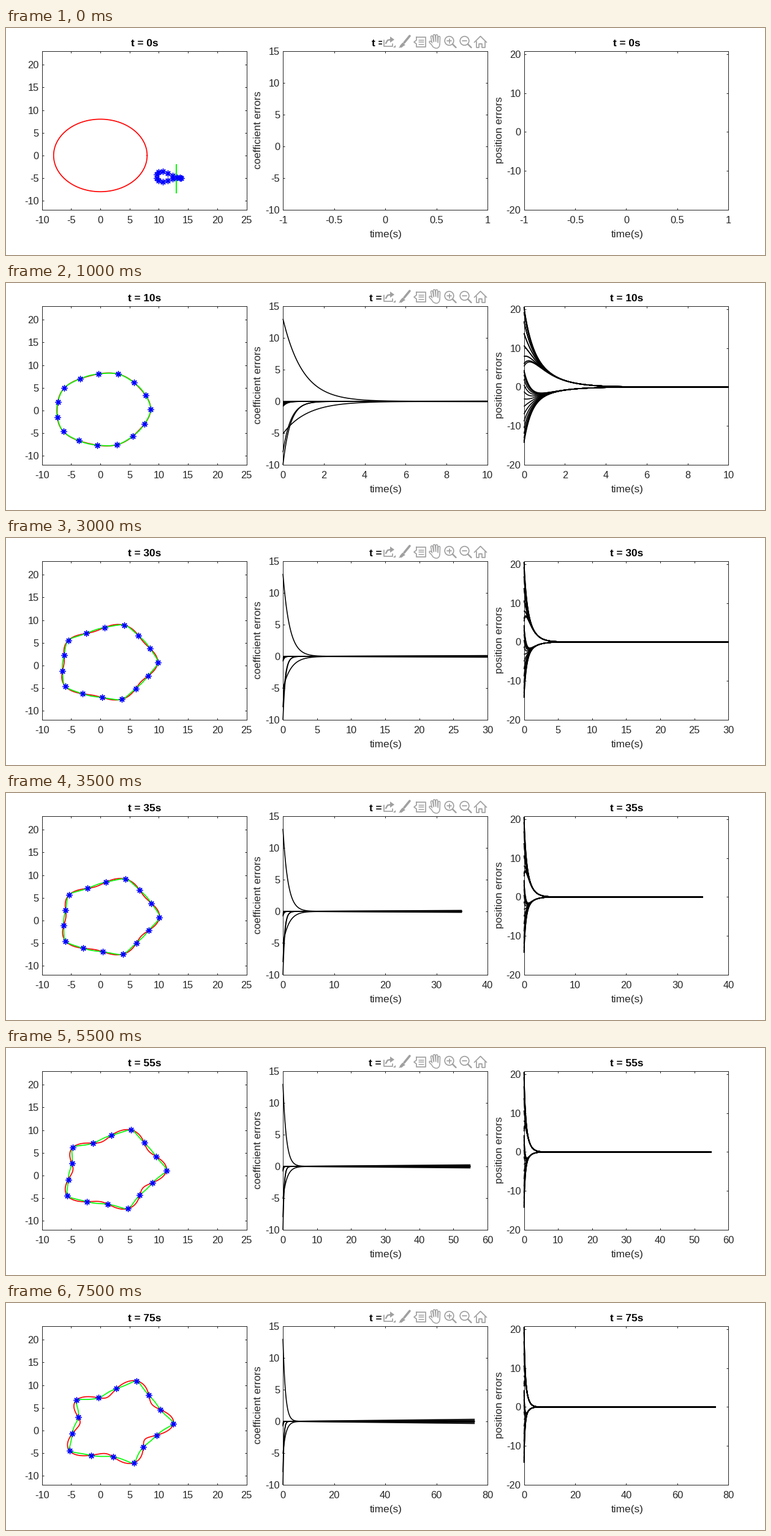
A matplotlib script that plays this animation: 1239x372 px, repeating every 8000 ms.

```python
import numpy as np
import matplotlib.pyplot as plt
from matplotlib.animation import FuncAnimation
from matplotlib.patches import Circle, Polygon, Rectangle

W, H, DPI = 1239, 372, 64
PT = 72 / DPI               # points per pixel
FRAMES, STEP = 16, 5        # one picture per 5 simulated seconds
N = 15                      # number of agents
INK, GRAY = "#262626", "#a0a0a0"

plt.rcParams.update({"font.family": "Liberation Sans", "axes.unicode_minus": False})
fig = plt.figure(figsize=(W / DPI, H / DPI), dpi=DPI, facecolor="white")


def panel(column, ylim, yticks):
    left, top, width, height = 58.65 + 393.45 * column, 38, 333.9, 260
    ax = fig.add_axes([left / W, 1 - (top + height) / H, width / W, height / H])
    ax.set_ylim(ylim)
    ax.set_yticks(yticks, [f"{v:g}" for v in yticks])
    ax.tick_params(direction="in", top=True, right=True, length=3.3 * PT, width=PT,
                   color=INK, labelcolor=INK, labelsize=16.4 * PT)
    ax.tick_params(axis="x", pad=10 * PT)
    ax.tick_params(axis="y", pad=5 * PT)
    for side in ax.spines.values():
        side.set(linewidth=PT, color=INK)
    return ax


def set_time_axis(ax, lo, hi, step):
    ticks = np.arange(lo, hi + step / 2, step)
    ax.set_xlim(lo, hi)
    ax.set_xticks(ticks, [f"{v:g}" for v in ticks])


shape_ax = panel(0, (-12, 23), range(-10, 21, 5))
coef_ax = panel(1, (-10, 15), range(-10, 16, 5))
pos_ax = panel(2, (-20, 20.75), range(-20, 21, 10))
set_time_axis(shape_ax, -10, 25, 5)

# Full-stage layer in pixel units for titles, labels and the toolbar
top = fig.add_axes([0, 0, 1, 1], facecolor="none")
top.set(xlim=(0, W), ylim=(H, 0))
top.axis("off")


def label(x, y, s, **kw):
    style = dict(ha="center", va="baseline", fontsize=17.2 * PT, color=INK)
    return top.text(x, y, s, **{**style, **kw})


titles = [label(226 + 393.7 * k, 30, "", weight="bold", color="black") for k in range(3)]
for x, s in ((416, "coefficient errors"), (810, "position errors")):
    label(x, 167, s, rotation=90, rotation_mode="anchor")
    label(x + 204, 343, "time(s)")


def stroke(*points, width=1.7, color=GRAY):
    x, y = zip(*points)
    top.plot(x, y, color=color, lw=width * PT, zorder=6,
             solid_joinstyle="round", solid_capstyle="round")


def triangle(*points):
    top.add_patch(Polygon(points, fc=GRAY, ec="none", zorder=6))


def export_icon(x, y):
    stroke((x, y - 3), (x, y + 7), (x + 14, y + 7), (x + 14, y + 3))
    stroke((x + 3, y + 2), (x + 6, y - 3), (x + 11, y - 4), width=2.4)
    triangle((x + 10, y - 9), (x + 17, y - 4), (x + 10, y + 1))
    triangle((x + 19, y + 5), (x + 19, y + 9), (x + 15, y + 9))


def brush_icon(x, y):
    stroke((x, y), (x + 9, y - 11), width=3.6)
    triangle((x - 3, y), (x + 2, y + 4), (x - 9, y + 9))
    stroke((x - 2, y + 3), (x - 5, y + 6), width=4.5)


def data_tip_icon(x, y):
    stroke((x - 7, y - 8), (x + 8, y - 8), (x + 8, y + 8), (x - 7, y + 8),
           (x - 7, y + 3), (x - 11, y), (x - 7, y - 3), (x - 7, y - 8))
    for dy in (-3.5, 0, 3.5):
        stroke((x - 3, y + dy), (x + 5, y + dy), width=1.5)


def hand_icon(x, y):
    """Fingers and palm merged by drawing a gray pass, then a white one inside."""
    for inset, color in ((0, GRAY), (3, "white")):
        for k in range(4):
            tip = y - 12 + 1.2 * (k - 1.4) ** 2
            stroke((x + 3 * k - 3, y + 3), (x + 4 * k - 5.5, tip),
                   width=4.6 - inset, color=color)
        stroke((x - 2, y + 5), (x - 8, y - 1), width=4.6 - inset, color=color)
        stroke((x, y + 3), (x + 2, y + 4), width=12 - inset, color=color)


def zoom_icon(x, y, plus):
    top.add_patch(Circle((x, y), 7.3, fill=False, ec=GRAY, lw=1.7 * PT, zorder=6))
    stroke((x + 5.5, y + 5.5), (x + 11, y + 11), width=2.4)
    stroke((x - 3.5, y), (x + 3.5, y))
    if plus:
        stroke((x, y - 3.5), (x, y + 3.5))


def home_icon(x, y):
    stroke((x - 10, y + 1), (x, y - 9), (x + 10, y + 1))
    for side in (-1, 1):
        stroke((x + 7 * side, y - 1), (x + 7 * side, y + 9.5),
               (x + 2.5 * side, y + 9.5), (x + 2.5 * side, y + 3), (x, y + 3))


top.add_patch(Rectangle((613.5, 11), 173, 25.5, fc="white", ec="none", zorder=5))
export_icon(617, 23)
brush_icon(650, 24)
data_tip_icon(677, 23)
hand_icon(700.5, 24)
zoom_icon(723.5, 21, True)
zoom_icon(748.5, 21, False)
home_icon(774.5, 22.5)

THETA = np.linspace(0, 2 * np.pi, 1201)
AGENT = 2 * np.pi * np.arange(N) / N


def boundary(t):
    """Drifting five-lobed curve as complex points."""
    r = 8 + 0.02 * t * np.cos(5 * THETA) + 0.01 * t * np.sin(2 * THETA)
    return (0.04 + 0.02j) * t + r * np.exp(1j * THETA)


def agents(t):
    """Lopsided figure eight at rest, then even arc-length spacing on the boundary."""
    if t == 0:
        loop = 0.74 * (np.sin(AGENT) - 0.75 * np.sin(2 * AGENT))
        return 11.7 + 2.1 * np.cos(AGENT) + 1j * (loop - 4.75 - 0.2 * np.cos(AGENT))
    z = boundary(t)
    arc = np.append(0, np.cumsum(np.abs(np.diff(z))))
    return np.interp(np.arange(N) * arc[-1] / N, arc, z)


def estimate(t):
    """Minimum-norm Fourier curve of order 10 through the agents."""
    if t == 0:
        return 13 - 5.15j + 3.1j * np.sin(THETA)
    coef = np.fft.fft(agents(t)) / N
    z = np.zeros(THETA.size, complex)
    for k in range(-7, 8):
        wave = np.exp(1j * k * THETA)
        if abs(k) >= 5:
            wave = (wave + np.exp(1j * (k - N * np.sign(k)) * THETA)) / 2
        z += coef[k] * wave
    return z


def coef_errors(t):
    center = [13 * np.exp(-1.03 * t), -5.1 * np.exp(-0.85 * t)]
    size = [-8 * np.exp(-2.6 * t), -10 * np.exp(-2.8 * t)]
    ripple = [-0.16 * k * np.exp(-5 * t) + 0.0045 * np.cos(k * np.pi / 5) ** 3 * t
              for k in range(6)]
    return center + size + ripple


def pos_errors(t):
    far_x, far_y = 13 * np.exp(-1.03 * t), -5 * np.exp(-0.92 * t)
    near = np.exp(-3 * t)
    return ([far_x - 7.7 * np.cos(a) * near for a in AGENT]
            + [far_y - 9.4 * np.sin(a) * near for a in AGENT])


def black_lines(ax, count):
    # unclipped, so that steep starts stay visible over the left spine
    return [ax.plot([], [], color="black", lw=1.6 * PT, zorder=3, clip_on=False,
                    solid_capstyle="butt")[0] for _ in range(count)]


red, = shape_ax.plot([], [], color="red", lw=1.7 * PT)
green, = shape_ax.plot([], [], color="lime", lw=1.7 * PT)
stars, = shape_ax.plot([], [], ls="none", marker=(8, 2, 0), ms=10 * PT,
                       mec="blue", mew=1.4 * PT)
coef_lines = black_lines(coef_ax, 10)
pos_lines = black_lines(pos_ax, 2 * N)


def time_range(t):
    """Axis limits and tick step for a run of t seconds."""
    if t == 0:
        return -1, 1, 0.5
    for limit, step in ((5, 1), (10, 2), (30, 5), (60, 10), (80, 20)):
        if t <= limit:
            return 0, int(np.ceil(t / step)) * step, step


def draw(i):
    t = i * STEP
    for line, z in ((red, boundary(t)), (green, estimate(t)), (stars, agents(t))):
        line.set_data(z.real, z.imag)

    ts = np.linspace(0, t, 40 * t + 1) if t else np.array([])
    for line, e in zip(coef_lines + pos_lines, coef_errors(ts) + pos_errors(ts)):
        line.set_data(ts, e)
    for ax in (coef_ax, pos_ax):
        set_time_axis(ax, *time_range(t))
    for title in titles:
        title.set_text(f"t = {t}s")
    return [red, green, stars, *coef_lines, *pos_lines, *titles]


anim = FuncAnimation(fig, draw, frames=FRAMES, init_func=lambda: draw(0),
                     interval=500, repeat=True, repeat_delay=0, blit=False)
plt.show()
```
